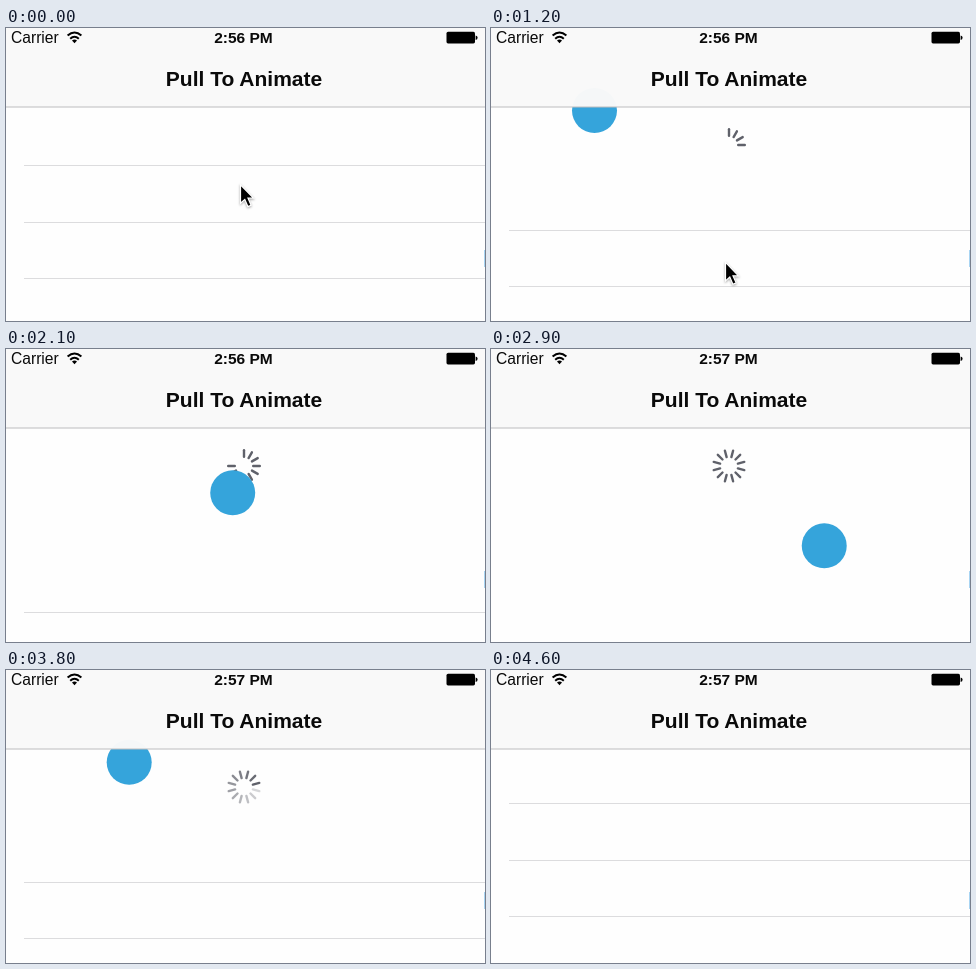
Write an HTML page that moves like this. It is 479 by 293 pixels and loops after 5100 ms.

```html
<!DOCTYPE html>
<html lang="en">
<head>
<meta charset="utf-8">
<title>Pull To Animate</title>
<style>
  html, body { margin: 0; width: 100%; height: 100%; overflow: hidden; background: #fefefe; }
  svg { display: block; width: 479px; height: 293px; }
  text { font-family: "Liberation Sans", Arial, sans-serif; fill: #0a0a0a; }
  .bold { font-weight: bold; text-anchor: middle; }
</style>
</head>
<body>
<svg viewBox="0 0 479 293">
  <rect width="479" height="293" fill="#fefefe"/>
  <g id="rows" fill="#dcdcde"></g>
  <g id="spinner" stroke="#5f616a" stroke-width="2.4" stroke-linecap="round"></g>
  <circle id="badge" r="22.5" fill="#35a4db"/>

  <rect width="479" height="79" fill="#f9f9f9" fill-opacity=".98"/>
  <rect y="78.5" width="479" height="1" fill="#bdbdbf"/>
  <rect x="478" y="222" width="1" height="17" fill="#a9d5f3"/>

  <text x="5" y="15.3" font-size="15.6">Carrier</text>
  <text id="clock" class="bold" x="237.5" y="15.3" font-size="15.5"></text>
  <text class="bold" x="238" y="58" font-size="21">Pull To Animate</text>

  <g fill="none" stroke="#000" stroke-width="2">
    <path d="M61.6 7.6Q68.5 1.4 75.4 7.6"/>
    <path d="M64.2 10.7Q68.5 6.8 72.8 10.7"/>
  </g>
  <path d="M66 12.6Q68.5 10.6 71 12.6L68.5 15.3Z"/>

  <rect x="440.5" y="3.8" width="28.5" height="11.6" rx="1.6"/>
  <path d="M469.6 7.6Q471.6 8 471.6 9.8T469.6 12Z"/>

  <path id="cursor" d="M0 0V18.5L4.3 14.6L7.4 21.8L10.6 20.4L7.5 13.4H13Z"
        stroke="#fff" stroke-width="1.2" style="filter: drop-shadow(0 1px 1px rgba(0,0,0,.35))"/>
</svg>
<script>
  const LOOP = 5100, STEP = 100, LAST_STEP = 4600;
  const REFRESH_START = 2700;
  const REST = 78.5;          // pull distance while refreshing
  const TICKS = 12;

  // [time, pull distance]
  const pullKeys = [
    [0, 4], [300, 2], [600, 0], [700, 0], [800, 10], [1000, 41], [1200, 68.7],
    [1800, 110], [2100, 130], [2300, 153], [2400, 166], [2600, 166], [2900, 183],
    [3200, 198], [3300, 188], [3400, 150], [3500, 114], [3600, 91], [3700, 81],
    [3800, REST], [4200, REST], [4300, 62], [4400, 32], [4500, 7], [4600, 0]
  ];

  const byId = id => document.getElementById(id);
  const clamp = (v, lo = 0, hi = 1) => Math.min(hi, Math.max(lo, v));
  const mod = (a, n) => ((a % n) + n) % n;

  function add(parent, tag, attrs) {
    const el = document.createElementNS("http://www.w3.org/2000/svg", tag);
    for (const name in attrs) el.setAttribute(name, attrs[name]);
    return parent.appendChild(el);
  }

  function pullAt(t) {
    const i = pullKeys.findIndex(key => key[0] >= t);
    if (i <= 0) return pullKeys[0][1];
    const [t0, a] = pullKeys[i - 1], [t1, b] = pullKeys[i];
    return a + (b - a) * (t - t0) / (t1 - t0);
  }

  const rows = [0, 1, 2].map(() => add(byId("rows"), "rect", { x: 18, width: 461, height: 1 }));
  const ticks = Array.from({ length: TICKS }, (_, i) =>
    add(byId("spinner"), "line", { y1: -9.2, y2: -15.8, transform: `rotate(${i * 30})` }));

  // Ticks appear one by one with the pull; once refreshing, the wheel turns half a tick and spins.
  function drawSpinner(t, pull) {
    const refreshing = t >= REFRESH_START;
    const count = refreshing ? TICKS : Math.floor((pull - 30) / 10.5) + 1;
    const fade = clamp((t - 2900) / 300);
    const head = Math.floor(2 + TICKS * (t - 3800) / 1000);
    ticks.forEach((tick, i) => {
      const age = mod(head - i, TICKS) / (TICKS - 1);
      tick.setAttribute("opacity", i < count ? 1 - fade * 0.75 * age : 0);
    });
    const size = t > 4200 ? clamp(pull / REST) : 1;
    const turn = refreshing ? 15 : 0;
    const spinner = byId("spinner");
    spinner.setAttribute("transform", `translate(238 117) rotate(${turn}) scale(${size})`);
    spinner.setAttribute("opacity", size);
  }

  function draw(time) {
    const t = Math.min(LAST_STEP, Math.floor((time % LOOP) / STEP) * STEP);
    const pull = pullAt(t);

    rows.forEach((row, i) => row.setAttribute("y", Math.floor(133.6 + 56.5 * i + pull)));
    drawSpinner(t, pull);

    const badge = byId("badge");
    badge.setAttribute("cx", 103.5 + 2.01 * (pull - 68.7));
    badge.setAttribute("cy", 13.8 + pull);

    const cursor = byId("cursor");
    cursor.setAttribute("transform", `translate(${233.3 + Math.min(pull / 3, 1.2)} ${152 + pull * 1.2})`);
    cursor.setAttribute("visibility", t < 2400 ? "visible" : "hidden");

    byId("clock").textContent = t < 2800 ? "2:56 PM" : "2:57 PM";
  }

  const start = performance.now();
  function frame() {
    draw(performance.now() - start);
    requestAnimationFrame(frame);
  }
  frame();
</script>
</body>
</html>
```
